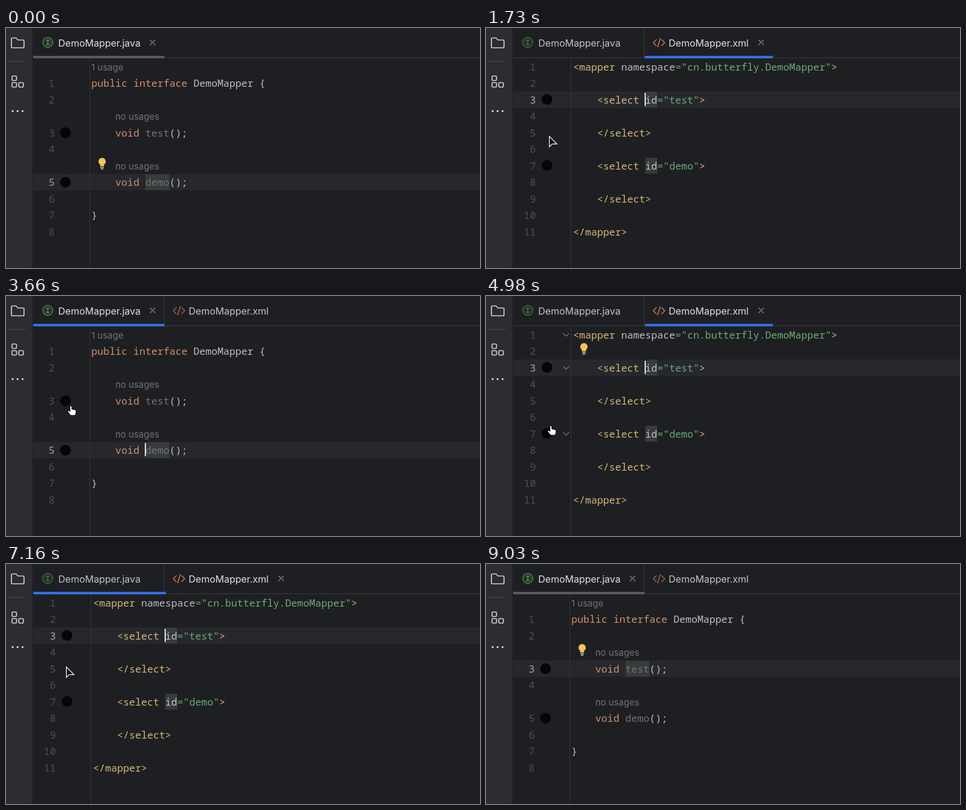
Write an HTML page that moves like this. It is 789 by 400 pixels and loops after 9100 ms.

```html
<!DOCTYPE html>
<html lang="en">
<head>
<meta charset="utf-8">
<title>Jumping between mapper and XML</title>
<style>
html, body { margin: 0; width: 100%; height: 100%; overflow: hidden; background: #1e1f22; }
svg { display: block; width: 789px; height: 400px; }
text { white-space: pre; }
.code { font: 16.667px "Noto Sans Mono", "DejaVu Sans Mono", monospace; fill: #bcbec4; }
.hint { font: 15px Inter, sans-serif; fill: #6f737a; }
.num { fill: #4b5059; text-anchor: end; }
.num.on { fill: #a1a3ab; }
.key { fill: #cf8e6d; }
.dim { fill: #6f737a; }
.tag { fill: #d5b778; }
.str { fill: #6aab73; }
.tab { font: 16px Inter, sans-serif; fill: #c3c5cb; }
.tab .icon { opacity: .75; }
.tab .close { display: none; }
.tab.on { fill: #dfe1e5; }
.tab.on .icon { opacity: 1; }
.tab.on .close { display: inline; }
.line { fill: none; stroke-linecap: round; stroke-linejoin: round; }
</style>
</head>
<body>
<svg viewBox="0 0 789 400">
  <rect width="789" height="400" fill="#1e1f22"/>
  <rect width="44" height="400" fill="#2b2d30"/>
  <g class="line" stroke="#ced0d6" stroke-width="1.7">
    <path d="M9 18.500a2 2 0 0 1 2-2h5.500l3.500 3.500h8a2 2 0 0 1 2 2v9a2 2 0 0 1-2 2h-17a2 2 0 0 1-2-2z"/>
    <rect x="10" y="80" width="7.500" height="7.500" rx="1.500"/>
    <rect x="10" y="91" width="7.500" height="7.500" rx="1.500"/>
    <rect x="21.300" y="91" width="7.500" height="7.500" rx="1.500"/>
  </g>
  <path d="M4 56H34" stroke="#43454a" stroke-width="1.300"/>
  <g fill="#ced0d6"><circle cx="11" cy="138.500" r="1.700"/><circle cx="19.300" cy="138.500" r="1.700"/><circle cx="27.600" cy="138.500" r="1.700"/></g>

  <path d="M45 49.500H789" stroke="#393b40"/>
  <g id="javaTab" class="tab">
    <g class="icon">
      <circle cx="69.500" cy="24" r="8.300" fill="#253627" stroke="#57965c" stroke-width="1.200"/>
      <path d="M67 20.500h5M69.500 20.500v7M67 27.500h5" stroke="#57965c" stroke-width="1.300"/>
    </g>
    <text x="87" y="31">DemoMapper.java</text>
    <path class="line close" d="M240 20l8 8M248 20l-8 8" stroke="#868a91" stroke-width="1.300"/>
  </g>
  <g id="xmlTab" class="tab">
    <path d="M263.500 0V49" stroke="#393b40"/>
    <path class="line icon" d="M283.500 19.500l-5 5 5 5M292.500 19.500l5 5-5 5M290 17.500l-4 14" stroke="#c77d55" stroke-width="1.500"/>
    <text x="304" y="31">DemoMapper.xml</text>
    <path class="line close" d="M454 20l8 8M462 20l-8 8" stroke="#868a91" stroke-width="1.300"/>
  </g>
  <rect id="underline" y="46.500" height="4" rx="2"/>

  <rect id="row" x="45" width="744" height="27.500" fill="#26282e"/>
  <g id="java"></g>
  <g id="xml"></g>
  <g id="folds" class="line" stroke="#6f737a" stroke-width="1.300">
    <path d="M129 62.500l4.500 4.500 4.500-4.500M129 117.500l4.500 4.500 4.500-4.500M129 227.500l4.500 4.500 4.500-4.500"/>
  </g>
  <rect id="caret" width="2" height="22" fill="#e4e6ea"/>
  <g id="bulb">
    <path d="M0-9.500a6 6 0 0 1 3.300 11V4.500h-6.600V1.500a6 6 0 0 1 3.300-11z" fill="#f2c55c"/>
    <path d="M-3 6.500h6M-2 9h4" stroke="#ced0d6" stroke-width="1.400"/>
  </g>

  <path id="arrow" d="M.5.500V18L5.200 13.300H13z" fill="#111214" stroke="#fff" stroke-width="1.200"/>
  <path id="hand" d="M-1.500 1.500a1.500 1.500 0 0 1 3 0v4l5.500 1.200a2 2 0 0 1 1.500 2v3l-1.500 4.300h-7.500l-4.500-6a1.300 1.300 0 0 1 2-1.700l1.500 1.400z" fill="#fff" stroke="#000"/>
  <path id="beam" class="line" d="M-3-8h2l1 1 1-1h2M0-7V7M-3 8h2l1-1 1 1h2" stroke="#fff" stroke-width="1.200"/>
</svg>
<script>
const LOOP = 9100;
const $ = id => document.getElementById(id);
const show = (id, on) => $(id).setAttribute('visibility', on ? 'visible' : 'hidden');
const put = (id, attrs) => { for (const k in attrs) $(id).setAttribute(k, attrs[k]); };
const rowTop = row => 50.75 + 27.5 * row;
const baseline = row => rowTop(row) + 19.75;

function add(box, tag, attrs, text = '') {
  const el = document.createElementNS('http://www.w3.org/2000/svg', tag);
  for (const k in attrs) el.setAttribute(k, attrs[k]);
  el.textContent = text;
  box.append(el);
  return el;
}

// Each part is [class, text].
function code(view, x, row, parts) {
  const el = add(view, 'text', { class: 'code', x, y: baseline(row) });
  parts.forEach(([cls, text]) => add(el, 'tspan', { class: cls }, text));
}

function gutter(view, right, rows, edge, [iconX, iconYs]) {
  add(view, 'path', { d: `M${edge} 50V400`, stroke: '#313438' });
  rows.forEach((row, i) =>
    add(view, 'text', { class: 'code num', id: `${view.id}${i + 1}`, x: right, y: baseline(row) }, i + 1));
  iconYs.forEach(cy => add(view, 'circle', { cx: iconX, cy, r: 9, fill: '#050607' }));
}

const mark = (view, x, row, width) =>
  add(view, 'rect', { x, y: rowTop(row) + .5, width, height: 26.5, fill: '#373b39' });

const icons = { java: [99, [174.5, 257]], xml: [101.5, [119, 229]] };

const javaView = $('java');
gutter(javaView, 81, [1, 2, 4, 5, 7, 8, 9, 10], 139.5, icons.java);
const nameMark = mark(javaView, 232, 7, 40);
[[142, 0, '1 usage'], [182, 3, 'no usages'], [182, 6, 'no usages']].forEach(([x, row, text]) =>
  add(javaView, 'text', { class: 'hint', x, y: baseline(row) }, text));
code(javaView, 142, 1, [['key', 'public interface '], ['', 'DemoMapper {']]);
[[4, 'test'], [7, 'demo']].forEach(([row, id]) =>
  code(javaView, 182, row, [['key', 'void '], ['dim', id], ['', '();']]));
code(javaView, 142, 9, [['', '}']]);

const xmlView = $('xml');
gutter(xmlView, 83, [...Array(11).keys()], 141.5, icons.xml);
code(xmlView, 145, 0, [['tag', '<mapper '], ['', 'namespace'], ['str', '="cn.butterfly.DemoMapper"'], ['tag', '>']]);
[[2, 'test'], [6, 'demo']].forEach(([row, id]) => {
  mark(xmlView, 265, row, 20);
  code(xmlView, 185, row, [['tag', '<select '], ['', 'id'], ['str', `="${id}"`], ['tag', '>']]);
  code(xmlView, 185, row + 2, [['tag', '</select>']]);
});
code(xmlView, 145, 10, [['tag', '</mapper>']]);
$('xml3').classList.add('on');

// start, view, current line, underline slide time
const views = [
  [0, 'java', 5, 1], [1270, 'xml', 3, 190], [3060, 'java', 5, 70], [4060, 'xml', 3, 200],
  [5780, 'java', 5, 130], [7160, 'xml', 3, 130], [7950, 'java', 3, 130]
];
const tabs = { java: [45, 264], xml: [264, 478] };
const blurred = [[0, 1200], [8960, LOOP]];
const caretOff = [...blurred, [1800, 2330], [2860, 3060], [5110, 5640]];
const bulbOn = [[0, 1270], [2860, 3060], [3790, 4060], [4910, 5780], [6700, 7160], [8690, LOOP]];
const foldsOn = [[1800, 3060], [4850, 5780], [7570, 7950]];
const within = (spans, t) => spans.some(([a, b]) => t >= a && t < b);

// time, x, y of the pointer
const route = [
  [130, 551, 350], [990, 105, 180], [1730, 105, 180], [2400, 106, 227], [3400, 106, 228],
  [3660, 108, 183], [3920, 102, 174], [4850, 102, 174], [4980, 108, 216], [5180, 106, 228],
  [6640, 106, 228], [6900, 100, 171], [7570, 100, 171], [7830, 102, 121], [8090, 102, 121],
  [8430, 598, 300], [8760, 716, 415]
];
const mix = (a, b, p) => a + (b - a) * p;

function pointer(t) {
  const i = route.findIndex(k => k[0] > t);
  if (i < 1) return null;
  const [a, b] = [route[i - 1], route[i]];
  const p = 1 - (1 - (t - a[0]) / (b[0] - a[0])) ** 1.6;
  return [mix(a[1], b[1], p), mix(a[2], b[2], p)];
}

function drawPointer(t, view) {
  const pos = pointer(t);
  let kind = '';
  if (pos) {
    const [ix, iys] = icons[view];
    const onIcon = Math.abs(pos[0] - ix) < 10 && iys.some(y => Math.abs(pos[1] - y) < 14);
    kind = pos[0] > 140 ? 'beam' : onIcon ? 'hand' : 'arrow';
    put(kind, { transform: `translate(${pos.map(Math.round)})` });
  }
  ['arrow', 'hand', 'beam'].forEach(id => show(id, id === kind));
}

// The edge facing the new tab runs ahead of the other one.
function drawUnderline(t, n) {
  const [start, view, , time] = views[n];
  const to = tabs[view], from = tabs[n ? views[n - 1][1] : view];
  const p = Math.min(1, (t - start) / time);
  const lead = 1 - (1 - p) ** 1.4, lag = p ** 1.8;
  const left = mix(from[0], to[0], view === 'java' ? lead : lag);
  const right = mix(from[1], to[1], view === 'java' ? lag : lead);
  put('underline', { x: left, width: right - left, fill: within(blurred, t) ? '#5a5d63' : '#3574f0' });
}

function draw(t) {
  const n = views.findLastIndex(v => t >= v[0]);
  const [, view, line] = views[n];
  const isJava = view === 'java';
  const row = isJava ? (line === 5 ? 7 : 4) : 2;

  show('java', isJava);
  show('xml', !isJava);
  show('xmlTab', n > 0);
  $('javaTab').classList.toggle('on', isJava);
  $('xmlTab').classList.toggle('on', !isJava);
  drawUnderline(t, n);

  put('row', { y: rowTop(row) });
  if (isJava) {
    nameMark.setAttribute('y', rowTop(row) + .5);
    [3, 5].forEach(k => $('java' + k).classList.toggle('on', k === line));
  }
  put('caret', { x: isJava ? 231 : 264, y: Math.round(rowTop(row) + 2) });
  show('caret', !within(caretOff, t));
  put('bulb', { transform: isJava ? `translate(160 ${row === 7 ? 226 : 143})` : 'translate(163 88)' });
  show('bulb', within(bulbOn, t));
  show('folds', !isJava && within(foldsOn, t));
  drawPointer(t, view);
}

function tick() {
  draw(performance.now() % LOOP);
  requestAnimationFrame(tick);
}
tick();
</script>
</body>
</html>
```
